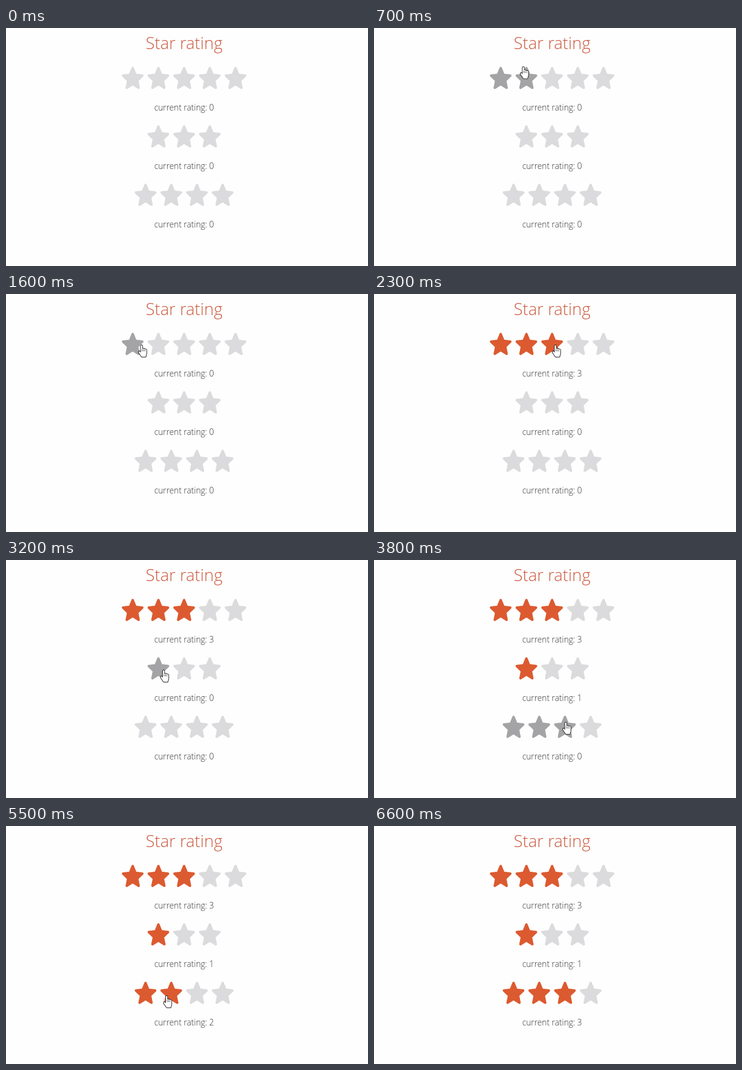
Recreate the animation shown at these times as an HTML page with a canvas. Size 600 by 395 pixels, loop 7.5 s.

```html
<!DOCTYPE html>
<html lang="en">
<head>
<meta charset="utf-8">
<title>Star rating</title>
<style>
  html, body { margin: 0; width: 100%; height: 100%; overflow: hidden; background: #fefefe; }
  canvas { display: block; width: 600px; height: 395px; }
</style>
</head>
<body>
<canvas id="stage" width="600" height="395"></canvas>
<script>
const ctx = document.getElementById('stage').getContext('2d');
const LOOP = 7500, TICK = 100;
const CENTER = 295.2, PITCH = 42.6, STAR_HEIGHT = 37;
const FIRST_ROW = 65, ROW_PITCH = 97;
const COLORS = { empty: '#dbdadc', hover: '#a4a3a5', rated: '#dc5a30' };

const rows = [
  { stars: 5, clicks: [{ at: 2300, rating: 3 }] },
  { stars: 3, clicks: [{ at: 3500, rating: 1 }] },
  { stars: 4, clicks: [{ at: 4500, rating: 4 }, { at: 5500, rating: 2 }, { at: 6300, rating: 3 }] }
];
rows.forEach((row, i) => row.top = FIRST_ROW + i * ROW_PITCH);

// The pointer rests between glides and leaves after the last one.
const entry = { x: 178, y: 20 };
const glides = [
  { from: 400, to: 1100, x: 327, y: 86 },
  { from: 1100, to: 1200, x: 346, y: 88 },
  { from: 1200, to: 1600, x: 219, y: 85 },
  { from: 1700, to: 2000, x: 295, y: 85 },
  { from: 2300, to: 2700, x: 306, y: 187 },
  { from: 2900, to: 3200, x: 255.5, y: 183 },
  { from: 3500, to: 4000, x: 350, y: 286 },
  { from: 4600, to: 5200, x: 260.5, y: 282 },
  { from: 5800, to: 6200, x: 309, y: 284 },
  { from: 6400, to: 6500, x: 263, y: 272 }
];

const hand = new Path2D('M4.4 10H13.8V15L12.4 20H5.9L1.2 13.2Q.5 10.8 2.3 10.8L4.4 13Z');
const knuckles = new Path2D();
for (let i = 0; i < 4; i++) {
  const x = 4.4 + 2.3 * i, y = i ? 5.6 + 0.6 * i : 0.8;
  hand.roundRect(x, y, 2.5, 13 - y, 1.25);
  if (i) {
    knuckles.moveTo(x, y + 1);
    knuckles.lineTo(x, 11);
  }
}
const arrow = new Path2D('M1 1V16L4.3 13L6.5 18L8.5 17L6.4 12.2H11Z');

const star = new Path2D();
for (let i = 0; i < 10; i++) {
  const angle = i * Math.PI / 5, radius = i % 2 ? 7.8 : 16.8;
  star.lineTo(radius * Math.sin(angle), -1.08 * radius * Math.cos(angle));
}
star.closePath();

const clamp = p => Math.max(0, Math.min(1, p));
const mix = (a, b, p) => a + (b - a) * p;
const easeOut = p => 1 - (1 - p) ** 2;

function pointerAt(time) {
  if (time < glides[0].from || time > glides.at(-1).to) return null;
  return glides.reduce((point, { from, to, x, y }) => {
    const p = clamp((time - from) / (to - from));
    return { x: mix(point.x, x, p), y: mix(point.y, y, easeOut(p)) };
  }, entry);
}

function hoveredStars(row, pointer) {
  if (!pointer) return 0;
  const y = pointer.y - row.top;
  const index = Math.floor((pointer.x + 5 - CENTER) / PITCH + row.stars / 2);
  const inside = y >= -2 && y <= STAR_HEIGHT && index >= 0 && index < row.stars;
  return inside ? index + 1 : 0;
}

function drawText(text, y, size, color) {
  ctx.font = `300 ${size}px "Open Sans", sans-serif`;
  ctx.fillStyle = color;
  ctx.fillText(text, CENTER, y);
}

function drawStar(x, y, color) {
  ctx.save();
  ctx.translate(x, y);
  ctx.fillStyle = ctx.strokeStyle = color;
  ctx.lineWidth = 4;
  ctx.lineJoin = 'round';
  ctx.fill(star);
  ctx.stroke(star);
  ctx.restore();
}

function drawRow(row, time, hover) {
  const rating = row.clicks.reduce((value, click) => time >= click.at ? click.rating : value, 0);
  for (let i = 0; i < row.stars; i++) {
    const state = i < rating ? 'rated' : i < hover ? 'hover' : 'empty';
    drawStar(CENTER + (i - (row.stars - 1) / 2) * PITCH, row.top + 19.6, COLORS[state]);
  }
  drawText('current rating: ' + rating, row.top + 72, 13.75, '#333');
}

function drawPointer({ x, y }, overStar) {
  const shape = overStar ? hand : arrow;
  ctx.save();
  ctx.translate(x, y - 0.8);
  ctx.fillStyle = '#fff';
  ctx.strokeStyle = '#222';
  ctx.lineWidth = 1.9;
  ctx.lineJoin = 'round';
  ctx.stroke(shape);
  ctx.fill(shape);
  ctx.lineWidth = 0.7;
  if (overStar) ctx.stroke(knuckles);
  ctx.restore();
}

function draw() {
  const time = Math.floor(performance.now() % LOOP / TICK) * TICK;
  const pointer = pointerAt(time);
  const hovers = rows.map(row => hoveredStars(row, pointer));
  ctx.fillStyle = '#fefefe';
  ctx.fillRect(0, 0, 600, 395);
  ctx.textAlign = 'center';
  drawText('Star rating', 35, 27.5, '#cb5a3e');
  rows.forEach((row, i) => drawRow(row, time, hovers[i]));
  if (pointer) drawPointer(pointer, hovers.some(Boolean));
  requestAnimationFrame(draw);
}
draw();
</script>
</body>
</html>
```
